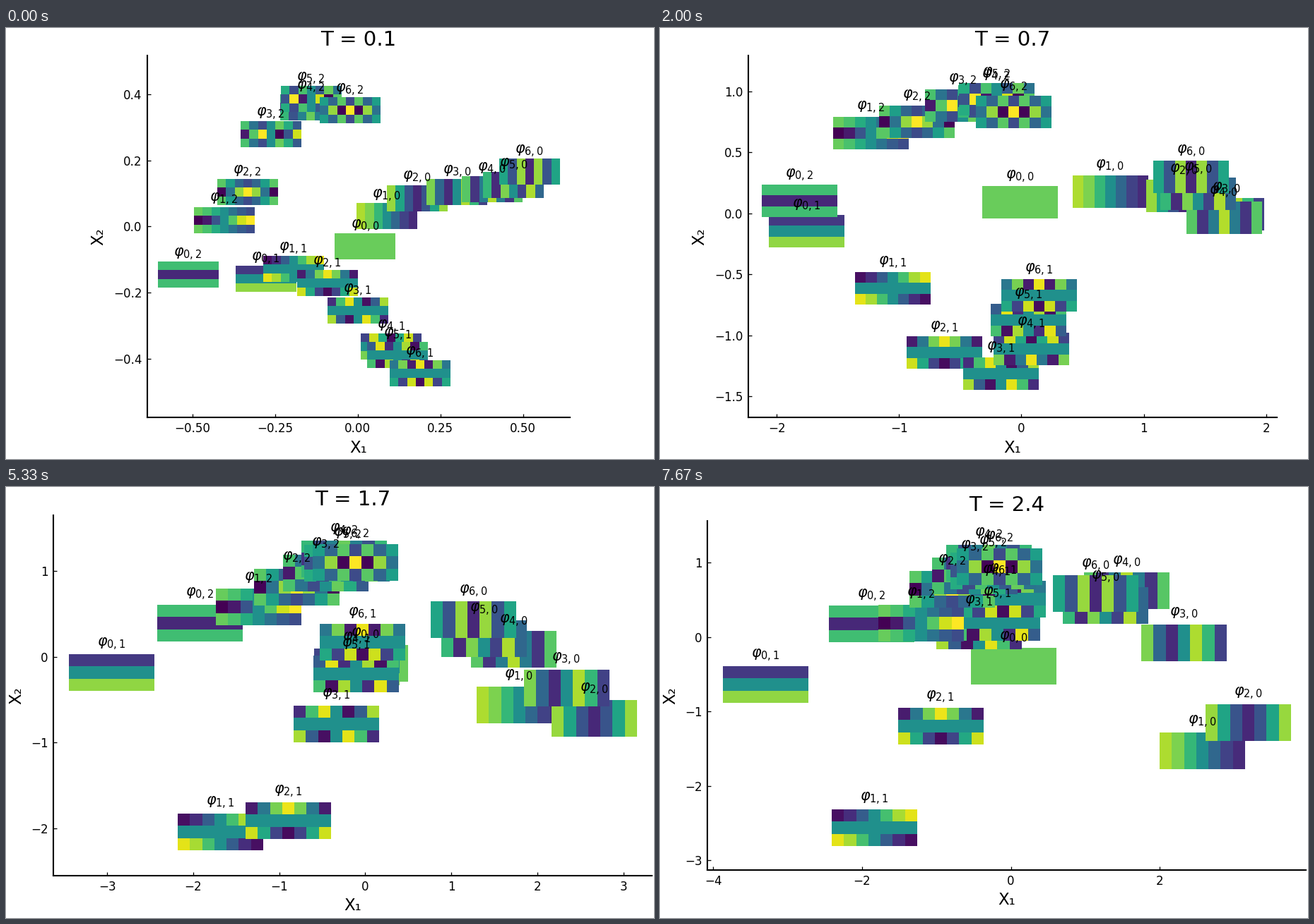
A matplotlib script that plays this animation: 917 by 611 pixels, repeating every 8 s.

```python
import numpy as np
import matplotlib.pyplot as plt
from matplotlib.animation import FuncAnimation

W, H, DPI = 917, 611, 128
STEPS, FRAMES, LOOP_MS = 24, 80, 8000
COLS, ROWS = 7, 3
TOP, BOTTOM, MAX_WIDTH = 39, 552, 847


def pt(px):
    return px * 72 / DPI


plt.rcParams.update({"font.family": "DejaVu Sans", "mathtext.fontset": "dejavusans"})


def cosine(k, n):
    return np.sqrt((1 if k == 0 else 2) / n) * np.cos(np.pi * k * (np.arange(n) + 0.5) / n)


# Laplacian eigenvectors of a 7 x 3 grid graph.
modes = [(i, j) for j in range(ROWS) for i in range(COLS)]
patterns = np.array([np.outer(cosine(j, ROWS), cosine(i, COLS)) for i, j in modes])
eigenvalues = np.array([4 - 2 * np.cos(np.pi * i / COLS) - 2 * np.cos(np.pi * j / ROWS)
                        for i, j in modes])
gradients = np.hstack([np.diff(patterns, axis=axis).reshape(len(modes), -1) for axis in (1, 2)])


def scaling(distance):
    """Classical multidimensional scaling to two dimensions."""
    n = len(distance)
    centering = np.eye(n) - 1 / n
    values, vectors = np.linalg.eigh(-centering @ distance ** 2 @ centering / 2)
    points = vectors[:, [-1, -2]] * np.sqrt(values[[-1, -2]])
    # Fix the signs: mode (0, 1) lies on the left and mode (1, 1) at the bottom.
    points[:, 0] *= -np.sign(points[modes.index((0, 1)), 0])
    points[:, 1] *= -np.sign(points[modes.index((1, 1)), 1])
    return points


def embeddings(substeps=20):
    """Distance of two modes: total variation of their difference as it diffuses up to T."""
    dt = 0.1 / substeps
    distance = np.zeros((len(modes), len(modes)))
    result = []
    for step in range(STEPS):
        for sub in range(substeps):
            t = (step * substeps + sub + 0.5) * dt
            flow = np.exp(-eigenvalues * t)[:, None] * gradients
            distance += dt * np.abs(flow[:, None] - flow[None]).sum(axis=-1)
        result.append(scaling(distance))
    return result


centers = embeddings()


def nice_ticks(lo, hi):
    """Choose a round step that gives about five ticks inside the limits."""
    best = None
    for scale in (0.1, 1):
        for q, niceness in ((1, 1), (5, .9), (2, .7), (2.5, .49), (3, .2)):
            step = q * scale
            ticks = np.arange(np.ceil(lo / step), np.floor(hi / step) + 1) * step
            score = 1 - abs(len(ticks) - 5) / 5 + niceness
            if 4 <= len(ticks) <= 8 and (best is None or score > best[0]):
                best = score, step, ticks
    _, step, ticks = best
    digits = next(d for d in range(3) if abs(step - round(step, d)) < 1e-9)
    labels = [f"{v + 0.0:.{digits}f}".replace("-", "\u2212") for v in ticks]
    return ticks, labels, digits


fig = plt.figure(figsize=(W / DPI, H / DPI), dpi=DPI, facecolor="white")
ax = fig.add_axes([0.1, 0.1, 0.8, 0.8])
ax.spines[["top", "right"]].set_visible(False)
ax.spines[["left", "bottom"]].set_linewidth(pt(2.1))
ax.tick_params(direction="in", length=pt(5), width=pt(1.3), pad=pt(7.3), labelsize=pt(16.7))

tiles = [ax.imshow(pattern, cmap="viridis", vmin=-0.4, vmax=0.4, origin="lower",
                   aspect="auto", interpolation="nearest") for pattern in patterns]
names = [ax.text(0, 0, rf"$\varphi_{{{i}, {j}}}$", fontsize=pt(20.8), ha="center", va="center")
         for i, j in modes]
title = fig.text(0, 0, "", fontsize=pt(29.2), ha="center")
x_name = fig.text(0, 0, "X₁", fontsize=pt(22.9), ha="center")
y_name = fig.text(0, 0, "X₂", fontsize=pt(22.9), ha="center", va="baseline",
                  rotation=90, rotation_mode="anchor")


def place(text, x, y):
    text.set_position((x / W, 1 - y / H))


def draw(frame):
    # 24 steps of a third of a second on a 100 ms clock
    step = (3 * frame + 2) // 10
    points = centers[step]
    low, high = points.min(axis=0), points.max(axis=0)
    span = high - low
    margin = span * [0.12, 0.1594]
    (x0, y0), (x1, y1) = low - margin, high + margin

    x_ticks, x_labels, _ = nice_ticks(x0, x1)
    y_ticks, y_labels, y_digits = nice_ticks(y0, y1)
    ax.set_xticks(x_ticks, x_labels)
    ax.set_yticks(y_ticks, y_labels)

    # Equal units on both axes: full height unless the width runs out.
    aspect = (x1 - x0) / (y1 - y0)
    width = min((BOTTOM - TOP) * aspect, MAX_WIDTH)
    height = width / aspect
    mid_x = 499 if y_digits else 490.5
    mid_y = (TOP + BOTTOM) / 2
    left, top, bottom = mid_x - width / 2, mid_y - height / 2, mid_y + height / 2
    ax.set_position([left / W, 1 - bottom / H, width / W, height / H])

    half_w = 0.176 * span[0] / 2
    half_h = half_w * ROWS / COLS
    for (x, y), tile, name in zip(points, tiles, names):
        tile.set_extent((x - half_w, x + half_w, y - half_h, y + half_h))
        name.set_position((x, y + 0.06 * span[0]))
    ax.set_xlim(x0, x1)
    ax.set_ylim(y0, y1)

    title.set_text(f"T = {(step + 1) / 10:.1f}")
    place(title, mid_x, top - 14)
    place(x_name, mid_x, bottom + 49.5)
    place(y_name, left - (62.3 if y_digits else 45.3), mid_y)
    return [*tiles, *names, title, x_name, y_name]


anim = FuncAnimation(fig, draw, frames=FRAMES, interval=LOOP_MS / FRAMES,
                     init_func=lambda: draw(0), repeat=True, repeat_delay=0, blit=False)
plt.show()
```
